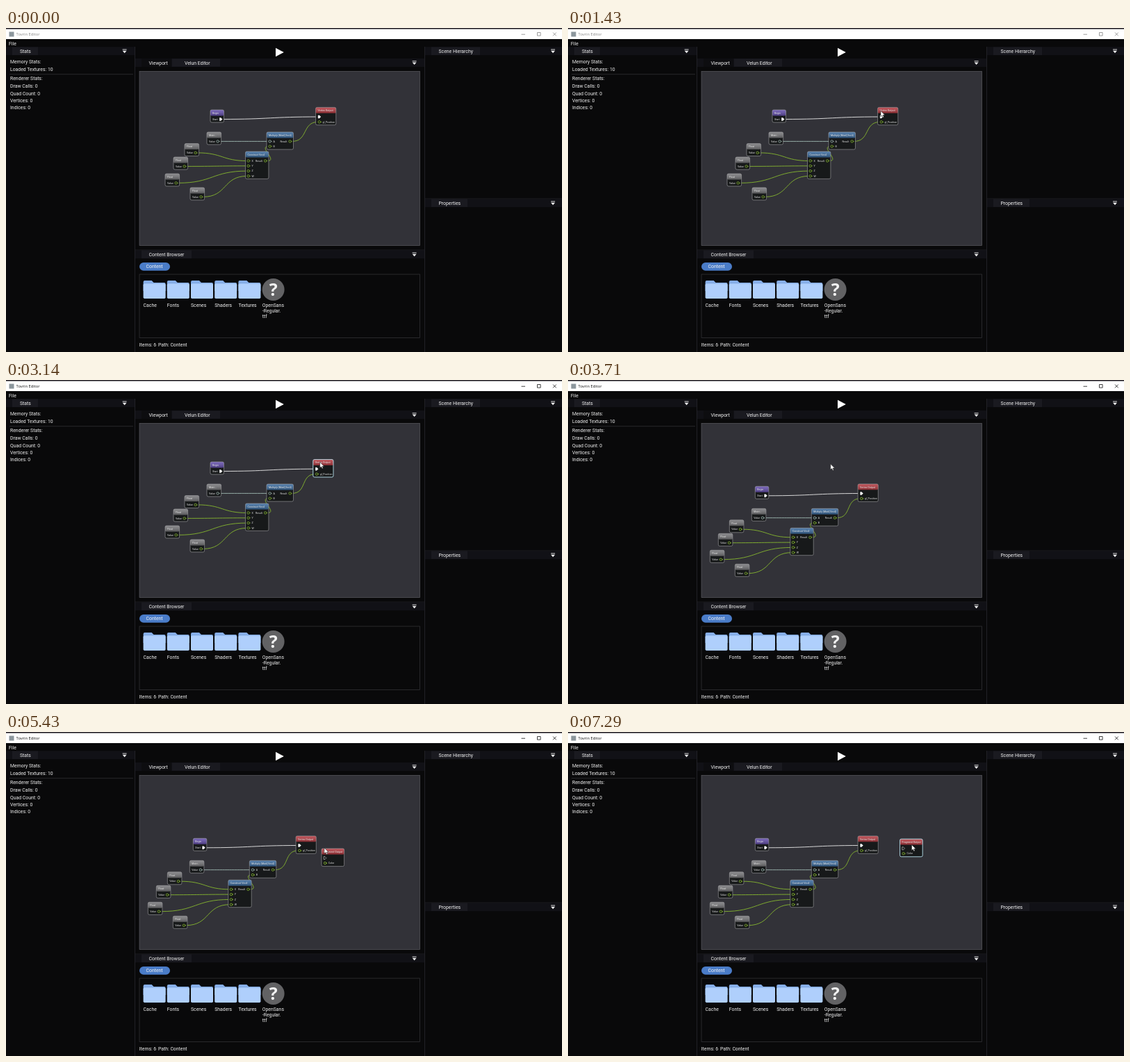
An HTML page for the animation above (8000 ms loop, 800 by 467 pixels).

```html
<!DOCTYPE html>
<html lang="en">
<head>
<meta charset="utf-8">
<title>Node editor</title>
<style>
html, body { margin: 0; width: 100%; height: 100%; overflow: hidden; background: #09090a; }
svg { display: block; width: 100%; height: 100%; }
text { font: 6.87px Roboto, sans-serif; fill: #f2f2f2; white-space: pre; }
.caption { font: 5.8px "Open Sans", sans-serif; fill: currentColor; }
.tiny { font-size: 3.6px; fill: #e4e4e4; }
.mark { font: 700 25px "Open Sans", sans-serif; text-anchor: middle; }
#titlebar { color: #858585; }
#titlebar.active { color: #111; }
.frame { fill: none; stroke: #a2a2a4; stroke-width: .6; }
.hover .frame { stroke: #b9e4f0; stroke-width: .9; }
.link { fill: none; stroke-width: .9; }
</style>
</head>
<body>
<svg viewBox="0 0 800 467" preserveAspectRatio="none">
  <defs>
    <clipPath id="view"><rect x="192" y="62.5" width="403.5" height="251"/></clipPath>
    <linearGradient id="shade" x2="0" y2="1">
      <stop stop-color="#fff" stop-opacity=".12"/><stop offset="1" stop-color="#000" stop-opacity=".28"/>
    </linearGradient>
  </defs>
  <rect width="800" height="467" fill="#09090a"/>
  <rect width="800" height="1.5" fill="#1b151d"/>
  <g id="titlebar">
    <rect y="1.5" width="800" height="14.5" fill="#fff"/>
    <rect x="4.5" y="5.5" width="7" height="7" fill="#8b969c"/>
    <text class="caption" x="14.6" y="11.2">Tovrin Editor</text>
    <path d="M741.5 9.2h5.5M764.5 6.5h4.6v4.6h-4.6zM787 6.5l4.8 4.8m0-4.8l-4.8 4.8" fill="none" stroke="currentColor" stroke-width=".8"/>
  </g>
  <g id="panels"></g>
  <g clip-path="url(#view)"><g id="graph"></g><g id="fragment"></g></g>
  <g id="menu"></g>
  <g id="submenu"></g>
  <g id="arrow"><path d="M0 0V8.2L1.9 6.5L3.2 9.4L4.6 8.8L3.3 6H6z" fill="#fff" stroke="#111" stroke-width=".5"/></g>
  <g id="mover"><path d="M0-5l2 2.3H.6V-.6H2.7V-2L5 0 2.7 2V.6H.6V2.7H2L0 5-2 2.7H-.6V.6H-2.7V2L-5 0-2.7-2V-.6H-.6V-2.7H-2z" fill="#fff" stroke="#111" stroke-width=".5"/></g>
</svg>
<script>
const el = id => document.getElementById(id);
const text = (x, y, s, cls = '') => `<text x="${x}" y="${y}" class="${cls}">${s}</text>`;
const rect = (x, y, w, h, fill, more = '') => `<rect x="${x}" y="${y}" width="${w}" height="${h}" fill="${fill}" ${more}/>`;
const path = (d, more) => `<path d="${d}" ${more}/>`;

// Editor panels
const tab = (x, y, w, tx, label, fill = '#1a1a20') => rect(x, y, w, 11.5, fill) + text(tx, y + 8.3, label);
const bar = (x, y, w, dropX) => rect(x, y, w, 12, '#111116') +
  path(`M${dropX - 3} ${y + 3.8}h6`, 'stroke="#f2f2f2" stroke-width=".9"') +
  path(`M${dropX - 3} ${y + 5.6}h6l-3 3.4z`, 'fill="#f2f2f2"');
const folder = (x, label) =>
  path(`M${x} 366q0-2 2-2h10l3 3h15q2 0 2 2v10h-32z`, 'fill="#86aee8"') +
  rect(x, 368.5, 32, 21.5, '#afcffc', 'rx="1.8"') + text(x, 402, label);

function panels() {
  const stats = [['Memory Stats:', 51.2], ['Loaded Textures: 10', 62.2], ['Renderer Stats:', 75.4],
    ['Draw Calls: 0', 86.2], ['Quad Count: 0', 96.6], ['Vertices: 0', 107], ['Indices: 0', 117.4]];
  const folders = ['Cache', 'Fonts', 'Scenes', 'Shaders', 'Textures'];
  return text(4, 24.7, 'File') +
    bar(0, 27.2, 185, 170.6) + tab(9, 27.5, 37, 20, 'Stats') +
    stats.map(([s, y]) => text(6, y, s)).join('') +
    rect(5, 66.5, 178, .6, '#3a3a3e') +
    path('M388 28.8L399.8 35L388 41.2z', 'fill="#fff"') +
    bar(186, 44, 416, 587.6) + tab(195, 44.3, 43, 205.5, 'Viewport', '#0d0d10') +
    tab(239, 44.3, 69, 257, 'Velun Editor') +
    rect(192, 62.5, 403.5, 251, '#323238', 'stroke="#5b5b60" stroke-width=".7"') +
    bar(186, 320.2, 416, 587.6) + tab(195, 320.5, 72, 205.5, 'Content Browser') +
    rect(192, 338, 44, 11.8, '#4a7cc8', 'rx="5.9"') + text(201.5, 346.4, 'Content') +
    rect(192, 355, 403.5, 91.5, '#09090a', 'stroke="#37373b" stroke-width=".7"') +
    folders.map((s, i) => folder(197.6 + i * 34.2, s)).join('') +
    '<circle cx="384.6" cy="377" r="16" fill="#626264"/>' + text(384.6, 386, '?', 'mark') +
    ['OpenSans', '-Regular.', 'ttf'].map((s, i) => text(368.8, 402 + i * 7.8, s)).join('') +
    text(191.7, 458.5, 'Items: 6') + text(219, 458.5, 'Path: Content') +
    bar(603, 27.2, 197, 787) + tab(612, 27.5, 70, 622.5, 'Scene Hierarchy') +
    bar(603, 246.2, 197, 787) + tab(612, 246.5, 52, 622.5, 'Properties') +
    rect(185, 27, .8, 440, '#29292e') + rect(602, 27, .8, 440, '#29292e') +
    rect(186, 319.6, 416, .6, '#25252a') + rect(603, 245.6, 197, .6, '#25252a');
}

// Node graph
const GREEN = '#86b72f', PALE = '#9fb9b1', WHITE = '#e8e8e8';
const GREY = '#77777a', BLUE = '#3c6c9f', RED = '#b53b42', PURPLE = '#6550ad';

const dataPin = (x, y, color = GREEN) =>
  `<circle cx="${x - .4}" cy="${y}" r="1.7" fill="#17191a" stroke="${color}" stroke-width=".8"/>` +
  path(`M${x + 1.6} ${y - 1}l1.3 1l-1.3 1z`, `fill="${color}"`);
const execPin = (x, y, fill = '#fff') =>
  path(`M${x - 1.6} ${y - 2}h1.7l2 2l-2 2h-1.7z`, `fill="${fill}" stroke="#fff" stroke-width=".5"`);
const node = (x, y, w, h, color, title, content) =>
  rect(x, y, w, h, '#17191a', 'rx="2"') +
  rect(x, y, w, 8.4, color, 'rx="1.6"') + rect(x, y, w, 8.4, 'url(#shade)', 'rx="1.6"') +
  text(x + 3, y + 5.8, title, 'tiny') + content +
  `<rect class="frame" x="${x}" y="${y}" width="${w}" height="${h}" rx="2"/>`;
const source = (x, y, title, color) =>
  node(x, y, 20.6, 18, GREY, title, text(x + 3, y + 14.7, 'Value', 'tiny') + dataPin(x + 16, y + 13.4, color));
const input = (x, y, label, color) => dataPin(x, y, color) + text(x + 4.4, y + 1.3, label, 'tiny');
const result = (x, y) => text(x - 14.6, y + 1.3, 'Result', 'tiny') + dataPin(x, y);
const link = (x1, y1, x2, y2, color) => {
  const c = Math.max(16, Math.hypot(x2 - x1, y2 - y1) / 2);
  return path(`M${x1} ${y1}C${x1 + c} ${y1} ${x2 - c} ${y2} ${x2} ${y2}`, `class="link" stroke="${color}"`);
};

const floats = [[257, 166.5], [241, 186], [229, 210], [265, 230]];
const fixedLinks = link(307.5, 163.4, 378, 163.4, PALE) + link(376, 191.5, 378, 170.6, GREEN) +
  floats.map(([x, y], i) => link(x + 18.5, y + 13.4, 347, 191.5 + i * 7.3, GREEN)).join('');
const fixedNodes =
  node(294, 118, 19.5, 18, PURPLE, 'Begin', text(297, 132.8, 'Start', 'tiny') + execPin(309, 131.5)) +
  source(289, 150, 'Matri...', PALE) +
  floats.map(([x, y]) => source(x, y, 'Float')).join('') +
  node(375, 150, 38.5, 25, BLUE, 'Multiply (Mat4,Vec4)',
    input(380, 163.4, 'A', PALE) + input(380, 170.6, 'B') + result(409, 163.4)) +
  node(344.5, 178, 33.4, 39.4, BLUE, 'Construct Vec4',
    [...'XYZW'].map((s, i) => input(349, 191.5 + i * 7.3, s)).join('') + result(373.5, 191.5));

function graph(dx, dy, hover) {
  const x = 445.6 + dx, y = 114.4 + dy;
  return link(311, 131.5, x + 4, y + 13.6, WHITE) + link(411.5, 163.4, x + 3.5, y + 21, GREEN) +
    fixedLinks + fixedNodes +
    `<g class="${hover ? 'hover' : ''}">` + node(x, y, 29.2, 25.4, RED, 'Vertex Output',
      execPin(x + 5.2, y + 13.6) + input(x + 5.6, y + 21, 'gl_Position')) + '</g>';
}

// Context menus
const ROW = 10.5;
const popup = (x, y, w, items, hot, nested) =>
  rect(x, y, w, items.length * ROW + 4, '#0b0b0d', 'stroke="#46464b" stroke-width=".6"') +
  items.map((s, i) => {
    const top = y + 1.6 + i * ROW;
    return (i === hot ? rect(x + 1.5, top, w - 3, ROW - .4, '#25272d') : '') + text(x + 4, top + 7.7, s) +
      (nested ? path(`M${x + 40.5} ${top + 2.5}l5.4 2.8l-5.4 2.8z`, 'fill="#f2f2f2"') : '');
  }).join('');
const categories = ['Debug', 'Events', 'Input', 'Logic', 'Math', 'Operators', 'Output'];

// Motion: keys are [ms, x, y], linear in between
const cursorKeys = [[140, 640, 300], [710, 433.5, 129], [1000, 440, 124], [1290, 448, 120], [1860, 456, 118],
  [2000, 456, 117.5], [2430, 468, 138], [2710, 484, 160], [3000, 464, 126], [3140, 452.2, 118.7], [3430, 402.2, 86.2],
  [3710, 377.5, 121.5], [4000, 393.5, 96], [4140, 394, 98], [4570, 404, 158.5], [4860, 410, 166],
  [5140, 455, 167], [5430, 458, 167], [5860, 470, 172], [6430, 505, 170], [6860, 492, 161], [7290, 494.5, 162.5]];
const vertexKeys = [[1860, 0, 0], [2000, 0, -1], [2430, 12, 20], [2710, 28, 42], [3000, 8, 8], [3140, -3.8, .2]];
const panKeys = [[3430, 0, 0], [3710, -24.7, 35.3]];
const fragmentKeys = [[5430, 454, 168], [5860, 454, 168], [6290, 466, 168], [6430, 466, 168], [6860, 477.6, 154.2]];

function at(keys, t) {
  const i = keys.findIndex(k => k[0] > t);
  if (i < 0) return keys[keys.length - 1].slice(1);
  if (i === 0) return keys[0].slice(1);
  const [t0, x0, y0] = keys[i - 1], [t1, x1, y1] = keys[i];
  const p = (t - t0) / (t1 - t0);
  return [x0 + (x1 - x0) * p, y0 + (y1 - y0) * p];
}
const move = (id, [x, y]) => el(id).setAttribute('transform', `translate(${x} ${y})`);
const show = (id, on) => { el(id).style.display = on ? '' : 'none'; };
const within = (t, from, to) => t >= from && t < to;

function draw(t) {
  const cursor = at(cursorKeys, t);
  const dragging = within(t, 1850, 3140) || within(t, 5850, 6850);
  el('titlebar').classList.toggle('active', t >= 1560);
  el('graph').innerHTML = graph(...at(vertexKeys, t), within(t, 1560, 3280));
  move('graph', at(panKeys, t));
  move('fragment', at(fragmentKeys, t));
  el('fragment').classList.toggle('hover', t >= 5850);
  show('fragment', t >= 5420);
  const open = within(t, 4130, 5420);
  show('menu', open);
  show('submenu', open && t >= 4850);
  if (open) {
    const row = t >= 4850 ? 6 : Math.floor((cursor[1] - 97.6) / ROW);
    el('menu').innerHTML = popup(393.6, 96, 49, categories, row, true);
  }
  move('arrow', cursor);
  move('mover', cursor);
  show('arrow', t >= 135 && !dragging);
  show('mover', dragging);
}

el('panels').innerHTML = panels();
el('fragment').innerHTML = node(0, 0, 32.6, 25.6, RED, 'Fragment Output',
  execPin(4.8, 13.6, 'none') + input(5.4, 21, 'Color'));
el('submenu').innerHTML = popup(442.6, 160.6, 62, ['Fragment Output', 'Vertex Output'], 0);

const STEP = 1000 / 7;
let last = -1;
function tick(now) {
  const step = Math.floor(((now % 8000) + 4) / STEP) % 56;
  if (step !== last) draw((last = step) * STEP);
  requestAnimationFrame(tick);
}
tick(performance.now());
</script>
</body>
</html>
```
